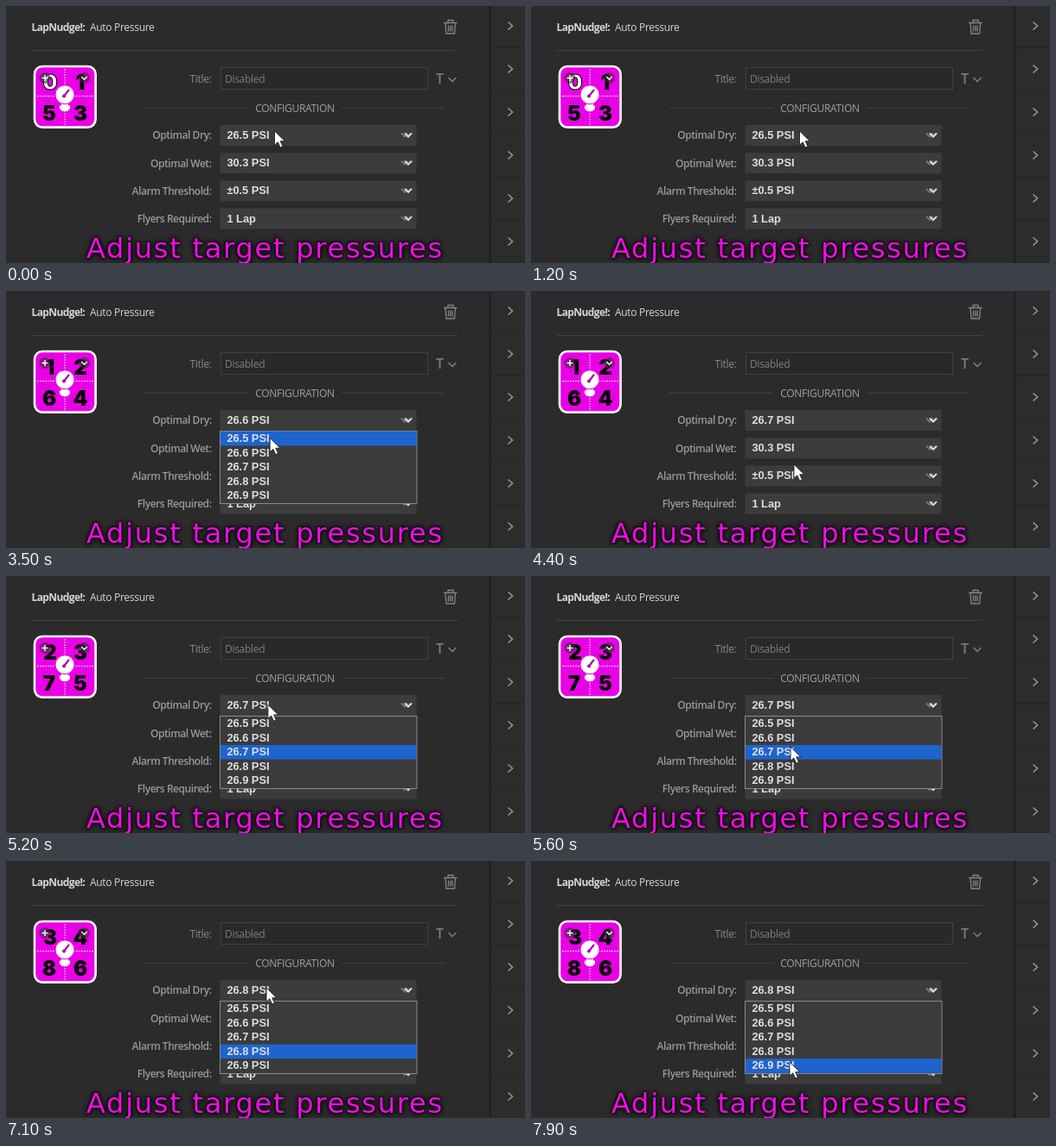
Animation, 600 px wide and 298 px high, one loop 8000 ms. Source, as an HTML page:

```html
<!DOCTYPE html>
<html lang="en">
<head>
<meta charset="utf-8">
<title>Pressure settings</title>
<style>
  html, body { margin: 0; width: 100%; height: 100%; overflow: hidden; background: #2b2b2b; }
  svg { display: block; width: 600px; height: 298px; font-family: "Open Sans", "Noto Sans", sans-serif; }
  .line { fill: none; stroke: #414141; }
  .icon { fill: none; stroke: #858585; stroke-width: 1.3; }
  .text { font-size: 12px; letter-spacing: -.3px; }
  .label { font-size: 12px; font-weight: 600; letter-spacing: -.45px; fill: #999; text-anchor: end; }
  .value { font: bold 12.8px "Liberation Sans", Arial, sans-serif; fill: #dedede; }
  .digit { font: 900 24px Inter, sans-serif; text-anchor: middle; }
  .caption {
    font: 400 32px "DejaVu Sans", sans-serif; letter-spacing: 1.75px; fill: #f40ce8;
    text-shadow: 0 0 3px #000, 0 0 4px #000, 0 1px 6px #000;
  }
</style>
</head>
<body>
<svg viewBox="0 0 600 298">
  <rect width="600" height="298" fill="#2b2b2b"/>
  <rect x="561" width="39" height="298" fill="#2c2c2c"/>
  <path d="M559.5 0V298" stroke="#1f1f1f" stroke-width="2"/>
  <g id="side"></g>

  <g class="text" fill="#d6d6d6">
    <text x="29.5" y="29" font-weight="700" letter-spacing="-.6">LapNudge!:</text>
    <text x="97" y="29">Auto Pressure</text>
  </g>
  <path class="line" d="M30 51.5H522"/>
  <path class="icon" d="M506 19.5H521.5M511 19V16.5H517V19M508 20L509 32H518.5L519.5 20M511.5 22.5V29.5M513.8 22.5V29.5M516 22.5V29.5"/>

  <text class="text" x="237.5" y="89" text-anchor="end" fill="#8a8a8a">Title:</text>
  <rect class="line" x="248.5" y="71.5" width="239" height="25" style="fill:#292929"/>
  <text class="text" x="253" y="89" fill="#7d7d7d">Disabled</text>
  <text x="497" y="90" font-size="16" font-weight="600" fill="#7c7c7c">T</text>
  <path class="icon" d="M511.5 83L516 87.5L520.5 83"/>
  <path class="line" d="M160 118.5H280M388 118.5H506"/>
  <text class="text" x="334" y="123" fill="#a0a0a0" text-anchor="middle">CONFIGURATION</text>

  <g id="tile">
    <rect x="33" y="70" width="70.6" height="70.6" rx="9" fill="#ea00e6" stroke="#fff" stroke-width="2.6"/>
    <path d="M68 73V139M36 104.5H101" stroke="#fff" stroke-opacity=".8" stroke-dasharray="2 1"/>
    <g id="digits"></g>
    <path d="M64 112H72V115.5H74V119L71 122H65L62 119V115.5H64Z" fill="#fff"/>
    <circle cx="68" cy="102.8" r="11" fill="#fff" stroke="#ea00e6"/>
    <path d="M67 104.5L72.5 97.5" stroke="#b000ad" stroke-width="2.2" stroke-linecap="round"/>
    <circle cx="67" cy="104.5" r="2" fill="#b000ad"/>
    <g fill="#333" fill-opacity=".6">
      <circle cx="45" cy="83.5" r="6.5"/>
      <circle cx="90.5" cy="83.5" r="6.5"/>
    </g>
    <path d="M41.5 83.5H48.5M45 80V87M87.3 82L90.5 85.2L93.7 82" fill="none" stroke="#fff" stroke-width="1.4"/>
  </g>

  <g id="fields"></g>
  <g id="menu">
    <rect x="247.5" y="162.5" width="227.5" height="84" fill="#3b3b3b" stroke="#8b8b8b"/>
    <rect id="hover" x="248" width="226.5" height="16.6" fill="#1e64cf"/>
    <g id="options"></g>
  </g>
  <text class="caption" x="93" y="291.5">Adjust target pressures</text>
  <path id="cursor" d="M0 0V16.2L3.8 12.8L6.6 19L9.4 17.8L6.7 11.7H11.8Z" fill="#fff" stroke="#111" stroke-width=".8"/>
</svg>
<script>
const $ = id => document.getElementById(id);
const LOOP = 8000, ROW = 16.6, DIGIT_LAG = 480;

// Cursor tip: [time, x, y]
const path = [
  [0, 310.5, 145], [1350, 310.5, 145], [1850, 307.5, 184], [2600, 307.5, 184],
  [3000, 306, 147], [3250, 306, 147], [3800, 304, 201], [4450, 304, 201],
  [4850, 303, 147], [5150, 303, 147], [5550, 300, 197], [5900, 301, 217],
  [6350, 301, 217], [6750, 302, 147], [7150, 301, 147], [7750, 299, 233], [8000, 299, 233]
];
const openTimes = [[1300, 2100], [3150, 4100], [5050, 6200], [6950, 8000]];
const pickTimes = [2100, 4100, 6200];
const pressure = i => `26.${5 + i} PSI`;

for (let i = 0; i < 6; i++) {
  const y = 23 + 50 * i;
  $("side").innerHTML += `<path d="M561 ${y + 25}H600" stroke="#252525"/>
    <path d="M580.5 ${y - 4.5}L585.5 ${y}L580.5 ${y + 4.5}" fill="none" stroke="#9a9a9a" stroke-width="1.5"/>`;
}

[["Optimal Dry:", ""], ["Optimal Wet:", "30.3 PSI"],
 ["Alarm Threshold:", "±0.5 PSI"], ["Flyers Required:", "1 Lap"]].forEach(([label, value], i) => {
  const y = 138 + 32.2 * i;
  $("fields").innerHTML += `<text class="label" x="237.5" y="${y + 16.3}">${label}</text>
    <rect x="247.5" y="${y}" width="227" height="24" fill="#3c3c3c"/>
    <text class="value" x="255.4" y="${y + 16}">${value}</text>
    <g fill="none" stroke-width="2">
      <path d="M457 ${y + 9.5}L461 ${y + 13.5}L465 ${y + 9.5}" stroke="#777"/>
      <path d="M461 ${y + 9.5}L465 ${y + 13.5}L469 ${y + 9.5}" stroke="#e2e2e2"/>
    </g>`;
});
const dryValue = $("fields").querySelector(".value");

for (let i = 0; i < 5; i++)
  $("options").innerHTML += `<text class="value" x="255.4" y="${175 + ROW * i}">${pressure(i)}</text>`;

[[51, 97], [86, 97], [50, 132.5], [86, 132.5]].forEach(([x, y]) =>
  $("digits").innerHTML += `<text class="digit" x="${x}" y="${y}"></text>`);
const digits = [...$("digits").children];

function cursorAt(t) {
  const i = path.findIndex(p => p[0] > t);
  const [t0, x0, y0] = path[i - 1], [t1, x1, y1] = path[i];
  const u = (t - t0) / (t1 - t0), e = u * u * (3 - 2 * u);
  return [x0 + (x1 - x0) * e, y0 + (y1 - y0) * e];
}

const picksBy = t => pickTimes.filter(p => p <= t).length;

function draw() {
  const t = performance.now() % LOOP;
  const [x, y] = cursorAt(t), picked = picksBy(t), shown = picksBy(t - DIGIT_LAG);
  $("cursor").setAttribute("transform", `translate(${x} ${y})`);
  dryValue.textContent = pressure(picked);

  const open = openTimes.some(([a, b]) => t >= a && t < b);
  $("menu").setAttribute("visibility", open ? "visible" : "hidden");
  const row = y < 163 ? picked : Math.min(4, Math.floor((y - 162.5) / ROW));
  $("hover").setAttribute("y", 162.8 + ROW * row);

  [0, 1, 5, 3].forEach((d, i) => digits[i].textContent = d + shown);
  // The zero is a light glyph with a dark rim
  digits[0].setAttribute("fill", shown ? "#000" : "#fff");
  digits[0].setAttribute("stroke", shown ? "none" : "#000");
  requestAnimationFrame(draw);
}
draw();
</script>
</body>
</html>
```
